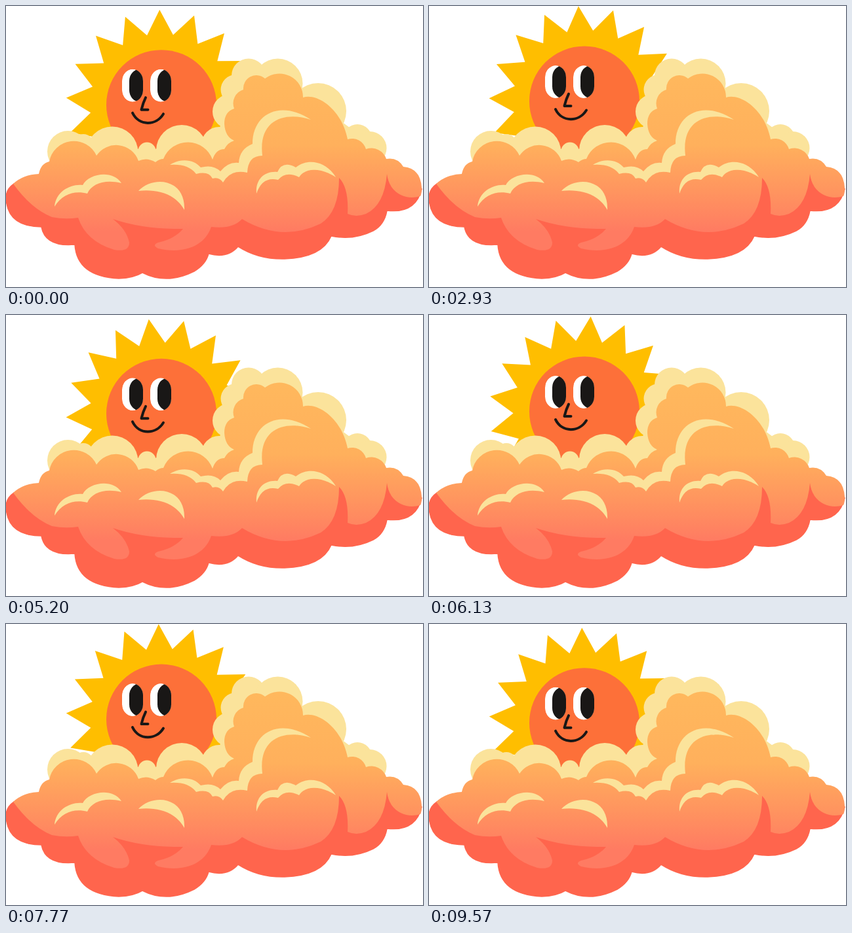
These frames come from a looping animation (636x430 px, 9610 ms). An HTML page:

```html
<!DOCTYPE html>
<html lang="en">
<head>
<meta charset="utf-8">
<title>Sun behind a cloud</title>
<style>
html, body { margin: 0; width: 100%; height: 100%; overflow: hidden; background: #fff; }
svg { display: block; width: 100vw; height: 100vh; }
</style>
</head>
<body>
<svg viewBox="0 0 636 430">
  <defs>
    <linearGradient id="glow" gradientUnits="userSpaceOnUse" x1="0" y1="105" x2="0" y2="345">
      <stop offset="0" stop-color="#ffb85d"/>
      <stop offset=".45" stop-color="#ffb05c"/>
      <stop offset=".75" stop-color="#ff945f"/>
      <stop offset="1" stop-color="#ff7b62"/>
    </linearGradient>
    <rect id="oval" width="32" height="50" rx="16" ry="18"/>
    <clipPath id="inEye"><use href="#oval"/></clipPath>
    <g id="eye" clip-path="url(#inEye)">
      <use href="#oval" fill="#fff"/>
      <use href="#oval" x="11" fill="#191716"/>
    </g>
  </defs>

  <!-- sun, drawn around its own centre -->
  <g id="sun">
    <polygon id="rays" fill="#ffbe00"/>
    <circle r="84" fill="#fd7039"/>
    <use href="#eye" x="-60" y="-54.500"/>
    <use href="#eye" x="-17" y="-54.500"/>
    <g fill="none" stroke="#191716" stroke-width="4" stroke-linecap="round" stroke-linejoin="round">
      <path d="M-24-11Q-28-3-30.500 7.500H-20.500"/>
      <path d="M-44 12.500C-34 33-8 32 3 14"/>
    </g>
  </g>

  <!-- pale rim of the cloud -->
  <g fill="#fbe39b">
    <path d="M66 240L95 205L162 200L215 225L268 200L320 200L350 128L370 106L415 110L476 150L536 195L556 210L578 238Z"/>
    <circle cx="94.500" cy="222.500" r="31.500"/>
    <circle cx="118" cy="212" r="16"/>
    <circle cx="162" cy="224" r="39.500"/>
    <circle cx="215" cy="222" r="13.500"/>
    <circle cx="268" cy="221" r="39"/>
    <circle cx="325" cy="212" r="27"/>
    <circle cx="341.500" cy="161.500" r="26.500"/>
    <circle cx="350.500" cy="128" r="23"/>
    <circle cx="370" cy="106.500" r="26"/>
    <circle cx="414.500" cy="118.500" r="38"/>
    <circle cx="476" cy="161" r="43"/>
    <circle cx="536" cy="203" r="22"/>
    <circle cx="555" cy="217.500" r="25.500"/>
  </g>

  <!-- shaded underside -->
  <path fill="#ff654d" stroke="#ff654d" stroke-width="1.500" d="M12 272Q0 280 0 294Q2 338 54 338Q60 369 105 365Q108 414 172 417
    Q195 416 208 408Q245 427 287 406Q305 395 309 379Q338 387 354 368Q385 388 425 387
    Q482 385 496 352Q530 359 560 344Q577 335 581 313Q625 318 634 280L581 257L508 263L300 300Z"/>

  <!-- lit body -->
  <path fill="url(#glow)" d="M11 272Q26 258 50 257Q53 241 66 238A38 38 0 0 1 138 229
    A36 36 0 0 1 202 237Q215 231 228 239Q234 234 240 234A40 40 0 0 1 315 235
    Q320 219 333 219Q338 209 348 206Q334 200 333 180Q333 162 348 157
    A22 22 0 0 1 362 128A20 20 0 0 1 395 111A36 36 0 0 1 453 140C475 133 512 158 521 204
    A22 22 0 0 1 549 219A24 24 0 0 1 580 234Q597 231 606 246Q632 248 634 278
    Q634 288 632 291Q616 296 602 289Q584 280 581 257Q577 305 549 318Q534 324 521 318
    Q523 278 508 263Q508 315 480 333Q420 362 360 326Q345 342 313 338
    C303 368 270 380 232 371Q222 366 232 362Q258 356 270 341Q210 342 163 326Q184 342 188 362
    Q188 377 165 373Q122 360 110 324Q90 327 70 323Q38 310 11 272Z"/>

  <!-- highlights -->
  <g fill="#fbe39b">
    <path d="M74 307C76 284 98 272 117 274C126 256 163 250 176 271C150 265 131 272 124 287C104 282 86 288 74 307Z"/>
    <path d="M202 283C224 259 274 264 272 312C258 286 228 280 202 283Z"/>
    <path d="M250 243C267 232 287 235 297 247Q316 242 327 253Q339 238 355 240
      Q356 219 376 211C376 165 418 143 465 174C430 162 384 170 391 229Q369 229 368 255
      Q343 249 331 270Q325 261 315 264Q309 252 290 257Q278 241 250 243Z"/>
    <path d="M382 287C380 262 398 252 414 254Q422 236 442 247C463 231 490 240 503 262
      C482 248 457 246 447 262Q427 252 415 266Q391 260 382 287Z"/>
  </g>
</svg>
<script>
const LOOP = 9610, SPIKES = 17, TIP = 145.5, VALLEY = 108.5;
const SPIN = 35.4, START = -1.08;          // degrees per second, degrees
const sun = document.getElementById('sun');
const rays = document.getElementById('rays');

rays.setAttribute('points', Array.from({ length: SPIKES * 2 }, (_, i) => {
  const a = i * Math.PI / SPIKES, r = i % 2 ? VALLEY : TIP;
  return (r * Math.sin(a)).toFixed(2) + ',' + (-r * Math.cos(a)).toFixed(2);
}).join(' '));

// Five uneven holds per 200 ms, each advancing the pose by 40 ms.
function poseTime(ms) {
  const step = [70, 100, 130, 170].filter(t => ms % 200 >= t).length;
  return Math.min(Math.floor(ms / 200) * 200 + step * 40, 9560) / 1000;
}

function draw(ms) {
  const t = poseTime(ms);
  const y = 148 + 3.2 * Math.cos(2 * Math.PI * t / 4.8);
  sun.setAttribute('transform', `translate(237 ${y.toFixed(2)})`);
  rays.setAttribute('transform', `rotate(${(START + SPIN * t).toFixed(2)})`);
}

const begin = performance.now();
function tick() {
  draw((performance.now() - begin) % LOOP);
  requestAnimationFrame(tick);
}
tick();
</script>
</body>
</html>
```
